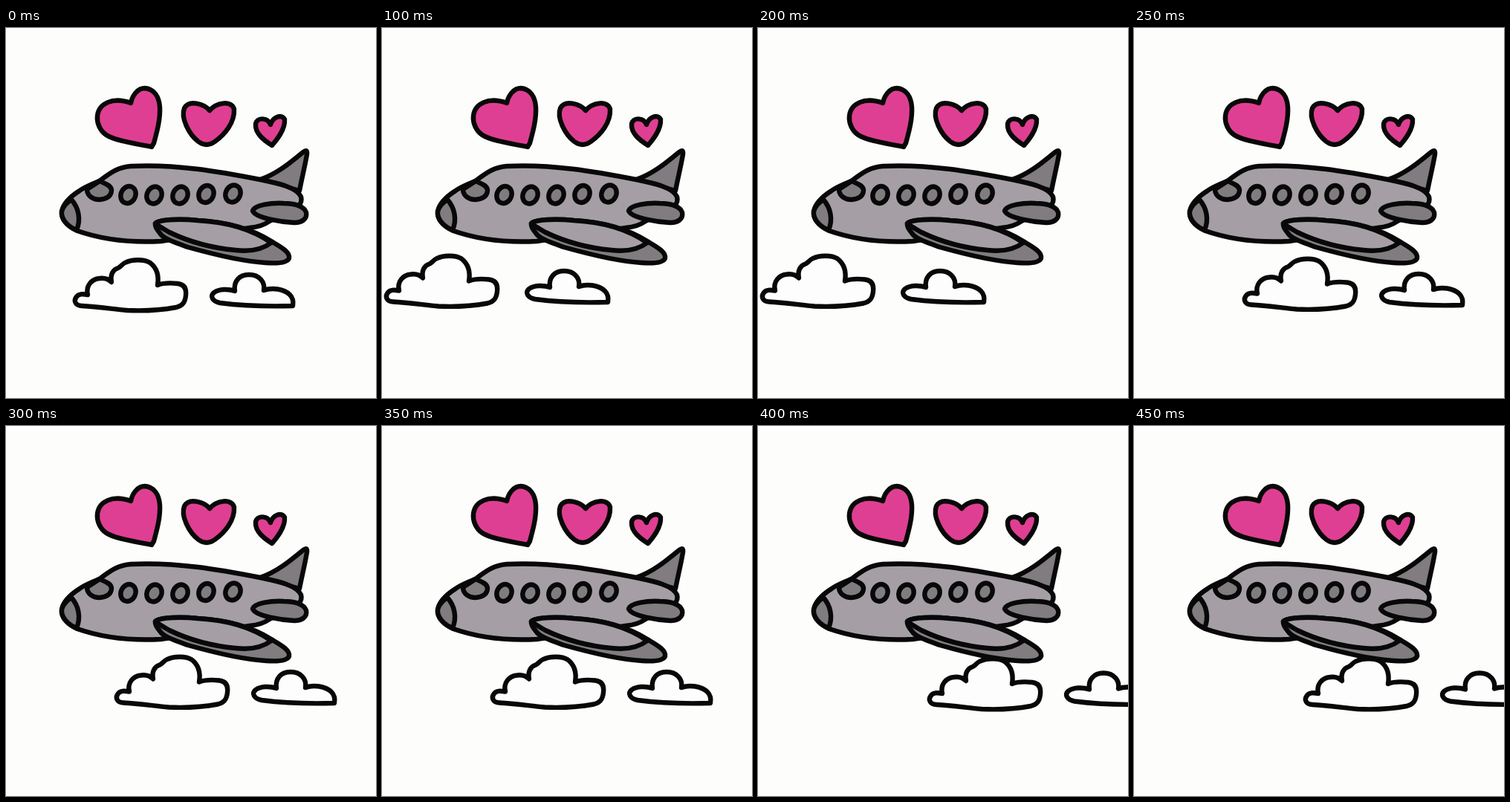
Recreate the animation shown at these times as an HTML page. Size 498 px wide and 498 px high, loop 0.5 s.

```html
<!DOCTYPE html>
<html lang="en">
<head>
<meta charset="utf-8">
<title>Plane with hearts</title>
<style>
  html, body { margin: 0; width: 100%; height: 100%; overflow: hidden; background: #fdfefc; }
  svg { display: block; width: 100vw; height: 100vh; stroke: #080808; stroke-width: 6.4; stroke-linecap: round; stroke-linejoin: round; }
  .heart { fill: #df3f92; }
  .cloud { fill: #fefdfe; }
  .body { fill: #a59fa5; }
  .dark { fill: #807c7f; }
</style>
</head>
<body>
<svg viewBox="0 0 498 498">
  <g class="cloud">
    <path id="bigCloud" d="M102 374C94 374 91 368 94 363C97 357 104 358 110 359C107 347 115 338 126 337C133 336 138 338 142 342C140 332 144 325 151 323C155 321 156 318 160 316C170 311 186 311 194 316C203 323 206 334 204 346C212 343 222 343 231 344C240 345 243 351 242 360C241 370 237 374 229 376C207 380 184 381 163 380C142 378 122 375 102 374Z"/>
    <path id="smallCloud" d="M288 370C278 368 274 361 280 356C287 351 299 351 308 354C306 341 314 332 327 332C341 332 349 342 347 353C358 349 374 351 382 359C386 363 387 368 386 374C353 375 319 374 288 370Z"/>
  </g>

  <g class="heart">
    <path d="M199 155L196 160C179 156 149 153 135 144C126 138 122 127 123 118C125 102 143 92 168 101C170 91 177 81 187 81C199 82 206 92 207 106C208 123 203 140 199 155Z"/>
    <path d="M274 111C267 102 246 96 240 108C235 121 246 143 259 153C266 158 274 158 281 153C295 143 308 127 307 109C303 97 284 100 274 111Z"/>
    <path d="M356 130C352 120 338 120 336 129C335 142 347 151 358 158C364 151 376 137 375 123C371 115 359 120 356 130Z"/>
  </g>

  <path class="dark" d="M342 204C364 197 383 181 400 167Q406 162 405 170C403 183 398 203 395 219Z"/>
  <path class="body" d="M75 247C77 236 88 226 99 219C107 213 117 210 127 205C138 197 150 187 168 186C228 183 286 193 342 204C366 209 391 214 397 227Q399 234 394 239L353 261Q345 267 328 269L208 287C169 289 130 285 96 273C82 267 74 257 75 247Z"/>
  <path class="dark" d="M88 231C98 242 101 258 95 272C81 266 74 256 75 247Q77 238 88 231Z"/>
  <path class="dark" d="M109 217C109 226 117 231 126 231C136 230 142 226 142 218C141 211 132 209 126 206Z"/>
  <g class="dark" id="windows"></g>
  <path class="dark" d="M332 246C335 238 357 235 374 236C389 236 401 240 404 248C406 257 398 262 388 262C370 261 336 256 332 246Z"/>
  <path class="dark" d="M201 263C207 257 238 257 258 259C296 261 330 270 357 287C367 293 383 301 381 310C378 317 363 317 350 316C315 314 277 304 245 295C228 289 212 284 207 276C203 271 200 267 201 263Z"/>
  <path class="body" d="M201 263C207 257 238 257 258 259C296 261 330 270 357 289C344 299 326 301 309 299C276 296 245 287 220 275Q206 267 201 263Z"/>
</svg>
<script>
  const NS = "http://www.w3.org/2000/svg";
  const windows = document.getElementById("windows");
  for (const [x, y] of [[164.5, 224.5], [199.5, 225], [234.5, 225], [269.5, 223.5], [305.5, 223]]) {
    const pane = document.createElementNS(NS, "ellipse");
    pane.setAttribute("rx", 9.8);
    pane.setAttribute("ry", 11.8);
    pane.setAttribute("transform", `translate(${x} ${y}) rotate(25)`);
    windows.append(pane);
  }

  // The clouds jump between four poses.
  const LOOP = 500;
  const poses = [
    { from: 0, big: [0, 0], small: [0, 0] },
    { from: 100, big: [-87, -5.5], small: [-82, -5] },
    { from: 250, big: [56, -1.5], small: [56, -1] },
    { from: 400, big: [138, 1], small: [138, 0.5] }
  ];
  const bigCloud = document.getElementById("bigCloud");
  const smallCloud = document.getElementById("smallCloud");
  const place = (cloud, offset) => cloud.setAttribute("transform", `translate(${offset})`);

  function draw() {
    const time = performance.now() % LOOP;
    const pose = poses.findLast(p => time >= p.from);
    place(bigCloud, pose.big);
    place(smallCloud, pose.small);
    requestAnimationFrame(draw);
  }
  draw();
</script>
</body>
</html>
```
